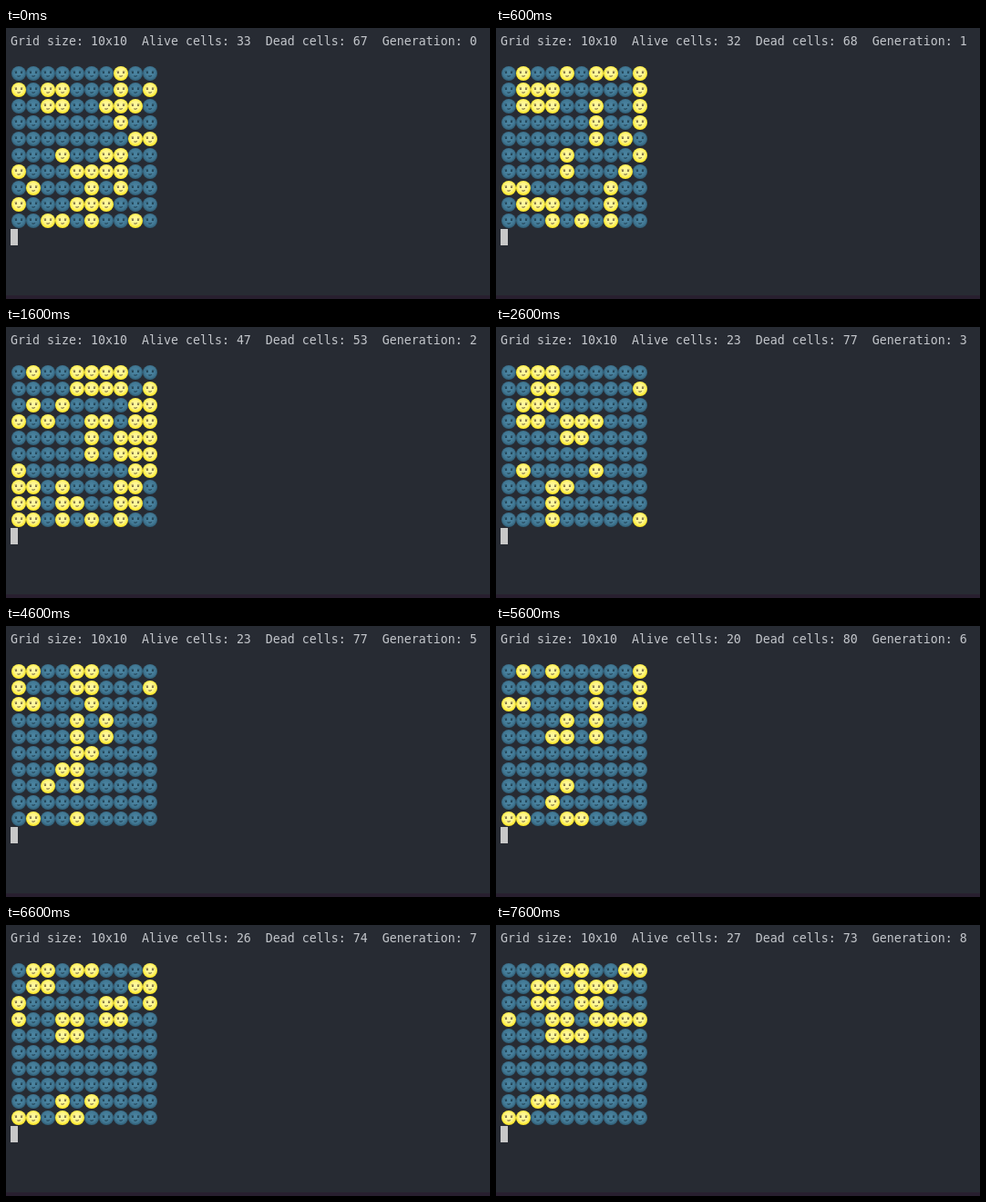
An HTML page for the animation above (8 s loop, 531x298 px).

```html
<!DOCTYPE html>
<html lang="en">
<head>
<meta charset="utf-8">
<title>Game of Life</title>
<style>
  html, body { margin: 0; width: 100%; height: 100%; overflow: hidden; background: #272b33; }
  svg { display: block; }
  text { font: 13.29px "DejaVu Sans Mono", "Noto Sans Mono", monospace; fill: #c3c6cb; white-space: pre; }
</style>
</head>
<body>
<svg width="531" height="298" viewBox="0 0 531 298">
  <defs>
    <radialGradient id="glow" cx=".5" cy=".45" r=".56">
      <stop offset="0" stop-color="#fff9a8"/>
      <stop offset=".55" stop-color="#fff585"/>
      <stop offset=".8" stop-color="#ffee45"/>
      <stop offset="1" stop-color="#f7df1e"/>
    </radialGradient>
    <radialGradient id="shade" cx=".5" cy=".45" r=".56">
      <stop offset="0" stop-color="#4d86a3"/>
      <stop offset=".65" stop-color="#427995"/>
      <stop offset="1" stop-color="#2d5a72"/>
    </radialGradient>
    <g id="face">
      <path d="M-4.6-2.2q1-.7 2.6-.2M4.6-2.2q-1-.7-2.6-.2" fill="none" stroke="currentColor" stroke-width=".7" opacity=".6"/>
      <ellipse cx="-3" cy="-.9" rx="1.2" ry=".8" fill="currentColor"/>
      <ellipse cx="3" cy="-.9" rx="1.2" ry=".8" fill="currentColor"/>
      <path d="M-1.6 2.9q1.8.7 3.4-.3" fill="none" stroke="currentColor" stroke-width=".9"/>
    </g>
    <g id="alive" color="#4b3d2b"><circle r="8" fill="url(#glow)"/><use href="#face"/></g>
    <g id="dead" color="#152c3a"><circle r="8" fill="url(#shade)"/><use href="#face"/></g>
  </defs>
  <rect width="531" height="298" fill="#272b33"/>
  <rect y="294" width="531" height="4" fill="#281f2f"/>
  <text id="status" x="5" y="19"></text>
  <g id="grid"></g>
  <rect x="5" y="221" width="8" height="18" fill="#c8c8c8"/>
</svg>
<script>
const SIZE = 10, LOOP = 8000;
const STARTS = [0, 600, 1600, 2600, 4000, 4600, 5600, 6600, 7600];
const SEED = `
  .......#..
  #.##...#.#
  ..##..###.
  .......#..
  ........##
  ...#..##..
  #...####..
  .#...#.#..
  #...###...
  ..##.#..#.`;

const wrap = n => (n + SIZE) % SIZE;

// One step of Life on a torus; the 3x3 sum includes the cell itself.
function step(cells) {
  return cells.map((alive, i) => {
    const x = i % SIZE, y = Math.floor(i / SIZE);
    let sum = 0;
    for (let dy = -1; dy <= 1; dy++)
      for (let dx = -1; dx <= 1; dx++)
        sum += cells[wrap(y + dy) * SIZE + wrap(x + dx)];
    return +(sum === 3 || (sum === 4 && alive === 1));
  });
}

const generations = [[...SEED.replace(/\s/g, "")].map(c => +(c === "#"))];
while (generations.length < STARTS.length) generations.push(step(generations.at(-1)));

const statusLine = document.getElementById("status");
const grid = document.getElementById("grid");
const moons = generations[0].map((_, i) => {
  const moon = document.createElementNS("http://www.w3.org/2000/svg", "use");
  moon.setAttribute("x", 14 + 16 * (i % SIZE));
  moon.setAttribute("y", 50 + 18 * Math.floor(i / SIZE));
  return grid.appendChild(moon);
});

function show(index) {
  const cells = generations[index];
  const alive = cells.reduce((a, b) => a + b);
  statusLine.textContent =
    `Grid size: ${SIZE}x${SIZE}  Alive cells: ${alive}  Dead cells: ${cells.length - alive}  Generation: ${index}`;
  moons.forEach((moon, i) => moon.setAttribute("href", cells[i] ? "#alive" : "#dead"));
}

let shown = -1;
const origin = performance.now();
function tick() {
  const time = (performance.now() - origin) % LOOP;
  const index = STARTS.findLastIndex(start => start <= time);
  if (index !== shown) show(shown = index);
  requestAnimationFrame(tick);
}
tick();
</script>
</body>
</html>
```
